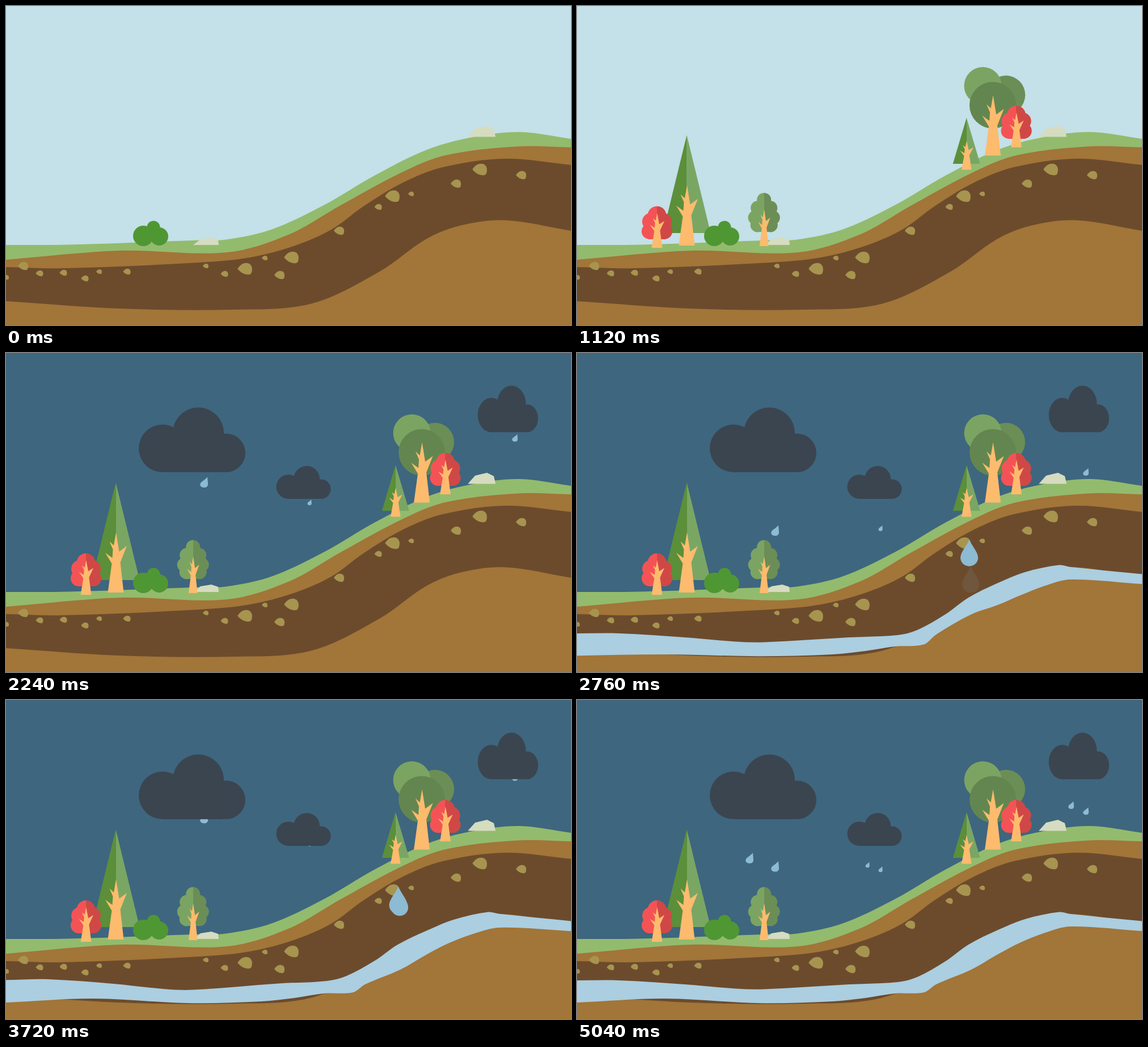
An HTML page that plays this animation: 996x562 px, repeating every 5.08 s.

```html
<!DOCTYPE html>
<html lang="en">
<head>
<meta charset="utf-8">
<title>Rain over the hills</title>
<style>
html, body { margin: 0; width: 100%; height: 100%; overflow: hidden; background: #c4e0e8; }
svg { display: block; width: 996px; height: 562px; }
</style>
</head>
<body>
<svg viewBox="0 0 996 562" xmlns="http://www.w3.org/2000/svg">
  <defs>
    <linearGradient id="red" gradientUnits="userSpaceOnUse" x1="-50" x2="50" y1="0" y2="0">
      <stop offset=".5" stop-color="#f45355"/><stop offset=".5" stop-color="#d04846"/>
    </linearGradient>
    <linearGradient id="leaf" gradientUnits="userSpaceOnUse" x1="-50" x2="50" y1="0" y2="0">
      <stop offset=".5" stop-color="#7ba463"/><stop offset=".5" stop-color="#6b8e56"/>
    </linearGradient>
    <linearGradient id="pine" gradientUnits="userSpaceOnUse" x1="-50" x2="50" y1="0" y2="0">
      <stop offset=".5" stop-color="#5b8f3a"/><stop offset=".5" stop-color="#7aa664"/>
    </linearGradient>
    <path id="trunk" fill="#fdbb6e" d="M-14 0L-7-51L-18.5-70L-6-61L-5-76L-11-90L-3.5-83L.5-106L6-72L19.5-82L8-53L14 0Z"/>
    <path id="pebble" d="M-1 0C-.7-.5-.3-.8.2-.8C.8-.8 1-.3 1 0C1 .5.9.8.5.8C-.1.8-.6.5-1 0Z"/>
    <path id="tear" d="M0 0C-3 9-15.5 22-15.5 32C-15.5 41-8 47 0 47C8 47 15.5 41 15.5 32C15.5 22 3 9 0 0Z"/>
    <path id="rain" d="M6-9C6.5-3 7 0 7 4C7 8 3 10 0 9.5C-5 9.5-7.5 6-6.5 3C-5.5-1 1-3 6-9Z"/>
    <g id="cloud">
      <circle cx="-146" cy="-42" r="42"/><circle cx="-83" cy="-69" r="45"/>
      <circle cx="-34" cy="-34" r="34"/><path d="M-146-66H-40V0H-146Z"/>
    </g>
    <g id="redTree">
      <g fill="url(#red)">
        <circle cy="-56.500" r="16.500"/><circle cx="-11" cy="-46" r="15"/><circle cx="11" cy="-46" r="15"/>
        <circle cx="-13" cy="-29" r="14"/><circle cx="13" cy="-29" r="14"/><path d="M-15-50H15V-15H-15Z"/>
      </g>
      <use href="#trunk" transform="scale(.67 .575)"/>
    </g>
  </defs>
  <rect id="sky" width="996" height="562"/>
  <g id="drops" fill="#8cbbd3"></g>
  <g id="clouds" fill="#3b4550"></g>
  <g id="land"></g>
  <g id="pebbles" fill="#a7944f"></g>
  <path id="water" fill="#abcee0"/>
  <path fill="#d5dcc0" d="M814 230.500L827 216L848 211L860 217L863 230.500ZM330 421L343 411L362 408L374 412L375 421Z"/>
  <g id="trees">
    <g data-x="193.500" data-y="422">
      <path fill="url(#pine)" d="M0-194L42-22H-42Z"/><use href="#trunk"/>
    </g>
    <g data-x="141" data-y="426"><use href="#redTree"/></g>
    <g data-x="329.700" data-y="423">
      <g fill="url(#leaf)">
        <circle cy="-81" r="12.500"/><circle cx="-11" cy="-67" r="12.500"/><circle cx="11" cy="-67" r="12.500"/>
        <circle cx="-15.500" cy="-50" r="12.500"/><circle cx="15.500" cy="-50" r="12.500"/>
        <circle cx="-11.500" cy="-37" r="12.500"/><circle cx="11.500" cy="-37" r="12.500"/><path d="M-14-70H14V-25H-14Z"/>
      </g>
      <use href="#trunk" transform="scale(.56 .61)"/>
    </g>
    <g data-x="733" data-y="263.500">
      <circle cx="23" cy="-106.500" r="34" fill="#6b8e56"/>
      <circle cx="-17.500" cy="-122.500" r="33" fill="#7ba463"/>
      <circle cx="0" cy="-88.500" r="41" fill="#638650"/>
      <use href="#trunk"/>
    </g>
    <g data-x="686.700" data-y="288.500">
      <path fill="url(#pine)" d="M0-91L24-10.500H-24Z"/>
      <use href="#trunk" transform="scale(.62 .48)"/>
    </g>
    <g data-x="774.500" data-y="249"><use href="#redTree"/></g>
  </g>
  <g fill="#4f9733">
    <circle cx="242" cy="405" r="18"/><circle cx="260" cy="390" r="11.5"/>
    <circle cx="270" cy="406" r="16"/><path d="M242 395H268V411H242Z"/>
  </g>
  <g fill="#8cbbd3">
    <use id="ghost" href="#tear"/>
    <use id="drop" href="#tear"/>
  </g>
</svg>
<script>
const LOOP = 5080;
const $ = id => document.getElementById(id);
const clamp = v => Math.max(0, Math.min(1, v));
const span = (t, start, length) => clamp((t - start) / length);
const smooth = u => u * u * (3 - 2 * u);
const mix = (a, b, u) => a + (b - a) * u;
const set = (el, name, value) => el.setAttribute(name, value);

function add(parent, tag, attrs) {
  const el = document.createElementNS("http://www.w3.org/2000/svg", tag);
  for (const name in attrs) set(el, name, attrs[name]);
  return parent.appendChild(el);
}

const points = text => text.split(" ").map(pair => pair.split(",").map(Number));

// Smooth curve through the points, level with its neighbours at each one.
function curve(p) {
  const slope = i => {
    const a = p[Math.max(0, i - 1)], b = p[Math.min(p.length - 1, i + 1)];
    return (b[1] - a[1]) / (b[0] - a[0]);
  };
  return p.map(([x, y], i) => {
    if (!i) return `${x} ${y}`;
    const [px, py] = p[i - 1], third = (x - px) / 3;
    return `C${px + third} ${py + third * slope(i - 1)} ${x - third} ${y - third * slope(i)} ${x} ${y}`;
  }).join("");
}

const layers = {
  grass: ["#93bb6d", "0,421 110,420.5 330,413 388,411.5 470,393 560,351 650,298.5 740,254 820,231.5 905,222 996,234"],
  clay: ["#a27538", "0,447 200,431 390,434 500,402 590,351 700,292 775,263 900,247.5 996,249"],
  soil: ["#6c4b2d", "0,460 100,462 340,452 430,443 510,422 575,393 630,353 700,311 770,284 880,269 996,280"],
  base: ["#a27538", "0,520 200,533 400,535 540,524 660,467 740,411 800,387 880,377.5 996,396"]
};
for (const [fill, line] of Object.values(layers))
  add($("land"), "path", { fill, d: `M${curve(points(line))}V562H0Z` });

// Pebbles grouped by half width
const pebbles = {
  5: "0,478 164,468 352,458 456,444 714,331",
  6.5: "59,471 101,470 139,480 213,468 385,472 656,354",
  9: "30,458 482,474 587,396 793,313 908,298",
  12.8: "421,463 503,443 681,335 835,288"
};
for (const [size, spots] of Object.entries(pebbles))
  for (const [x, y] of points(spots))
    add($("pebbles"), "use", { href: "#pebble", transform: `translate(${x} ${y}) scale(${size})` });

// Each cloud pivots on its lower right corner and drops two beads of rain.
const RAIN_TIME = 800;
const clouds = [
  { x: 422, y: 210, sx: 1, sy: 1, rainX: 349, gap: 45, fall: 131, bead: 1 },
  { x: 572.5, y: 257, sx: .511, sy: .509, rainX: 535, gap: 23, fall: 70, bead: .53 },
  { x: 938, y: 139.5, sx: .566, sy: .72, rainX: 897, gap: 26, fall: 92, bead: .72 }
];
for (const c of clouds) {
  c.el = add($("clouds"), "use", { href: "#cloud" });
  c.beads = [0, 1].map(() => add($("drops"), "use", { href: "#rain" }));
}

function drawCloud(c, t) {
  const left = (1 - span(t, 1395, 573)) ** 3, s = 1 - left;
  set(c.el, "transform", `translate(${c.x} ${c.y}) scale(${s * c.sx} ${s * c.sy}) rotate(${146 * left})`);
  c.beads.forEach((el, i) => {
    const age = t - 2000 - i * (RAIN_TIME + 90);
    const y = c.y - 7 - 15 * c.bead + c.fall * (age % RAIN_TIME) / RAIN_TIME;
    set(el, "opacity", age < 0 ? 0 : 1);
    set(el, "transform", `translate(${c.rainX - i * c.gap} ${y}) scale(${c.bead})`);
  });
}

const surface = points("0,494 75,494 190,501 280,508.5 330,509.5 480,501 565,497 600,488 650,460 690,431 740,406 790,386 850,373.5 870,377 996,389.5");
const bed = points("0,533 155,526 320,534 450,531 508,525 560,517 612,515 633,501 695,475 740,449 780,428 825,410 870,399 996,407");

// A swell lifts the surface; the bed starts thinner around the bend of the hill.
function drawWater(t) {
  const swell = smooth(span(t, 2760, 560)) - smooth(span(t, 3340, 580));
  const thin = 1 - smooth(span(t, 2760, 560));
  const bump = (x, at, width) => Math.exp(-(((x - at) / width) ** 2));
  const top = surface.map(([x, y]) =>
    [x, y - swell * (2 + 6 * Math.cos((x - 100) / 445 * 2 * Math.PI)) * (1 - (x / 996) ** 8)]);
  const low = bed.map(([x, y]) =>
    [x, y + swell * 7 * bump(x, 870, 80) - thin * 15 * bump(x, 685, 50) + thin * 5 * bump(x, 155, 90)]);
  set($("water"), "d", `M${curve(top)}L${curve(low.reverse())}Z`);
  set($("water"), "opacity", span(t, 2280, 280));
}

// Springs past full size, then settles.
function treeScale(t) {
  return t < 320 ? 1.11 * Math.sin(clamp(t / 320) * Math.PI / 2) : 1 + .11 * Math.exp((320 - t) / 200);
}

function drawTear(t) {
  const size = smooth(span(t, 2280, 240)) * (1 - smooth(span(t, 4480, 240)));
  const pulse = 1.035 + .055 * Math.cos((t - 3320) / 1600 * 2 * Math.PI);
  set($("drop"), "transform", `translate(691.500 328.500) scale(${size * pulse})`);
  const age = (t - 2491) % 600, shown = t >= 2491 && t < 4291;
  set($("ghost"), "opacity", shown ? clamp((289 - age) / 200) : 0);
  set($("ghost"), "transform", `translate(694 ${328 + age * .175}) scale(.97 1)`);
}

function draw(t) {
  const dusk = span(t, 1160, 400), day = [196, 224, 232], dark = [62, 102, 127];
  set($("sky"), "fill", `rgb(${day.map((v, i) => Math.round(mix(v, dark[i], dusk)))})`);
  [...$("trees").children].forEach((el, i) => {
    const s = treeScale(t - 60 - i % 3 * 30);
    set(el, "transform", `translate(${el.dataset.x} ${el.dataset.y}) scale(${s})`);
  });
  for (const c of clouds) drawCloud(c, t);
  drawWater(t);
  drawTear(t);
}

const begin = performance.now();
function tick() {
  draw((performance.now() - begin) % LOOP);
  requestAnimationFrame(tick);
}
draw(0);
requestAnimationFrame(tick);
</script>
</body>
</html>
```
